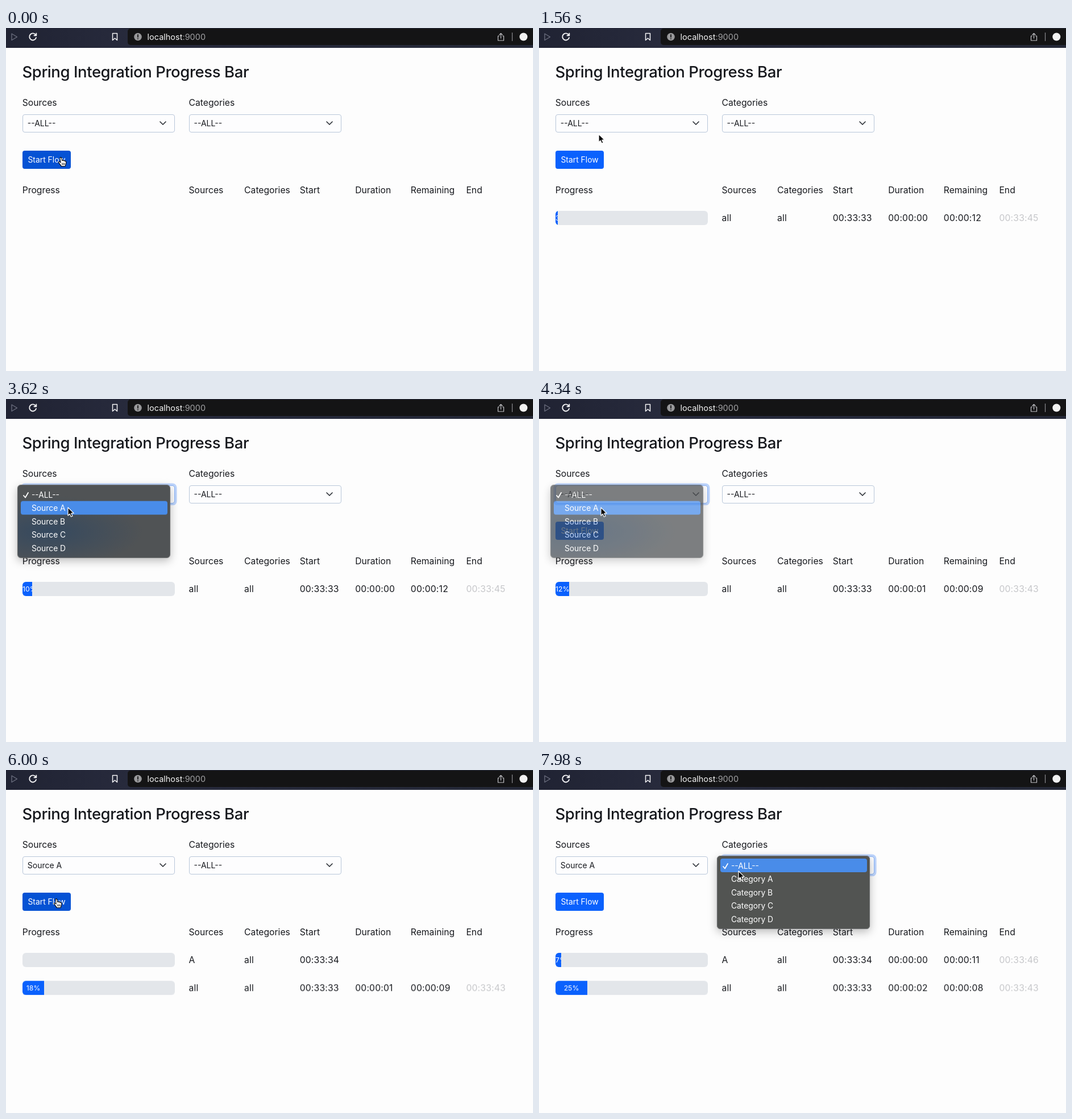
Animation, 927 px wide and 604 px high, one loop 8000 ms. Source, as an HTML page:

```html
<!DOCTYPE html>
<html lang="en">
<head>
<meta charset="utf-8">
<title>Progress bar demo</title>
<style>
@property --p { syntax: "<integer>"; inherits: true; initial-value: 0; }

html, body { margin: 0; width: 100%; height: 100%; overflow: hidden; }
body { background: #fdfdfd; color: #16181d; font: 15.7px/20px Inter, sans-serif; }
#stage { position: relative; width: 927px; height: 604px; overflow: hidden; }
#stage * { box-sizing: border-box; }
#stage div, #stage span, #stage svg, h1 { position: absolute; white-space: nowrap; }
svg { overflow: visible; fill: none; stroke-linecap: round; stroke-linejoin: round; }

/* every animation shares one 8 s loop */
.anim { animation: 8s linear infinite; }
.step { animation: 8s step-end infinite; }

.chrome { inset: 0 0 auto; height: 35px; background: linear-gradient(90deg, #202333, #272a3c 23%, #252938); }
.url { left: 214px; top: 1px; width: 720px; height: 29px; border-radius: 5px; background: #141415; }
.address { left: 248.5px; top: 5.5px; color: #f4f4f4; font-size: 14.5px; }
.address b { font-weight: 400; color: #a2a2a4; }

h1 { left: 28.5px; top: 67px; margin: 0; font-size: 27.5px; font-weight: 500; letter-spacing: -.42px; }
.col { left: calc(28.8px + var(--c) * 97.58px); }
.label { top: 121.5px; }
.head { top: 275.5px; }

.select { top: 151.5px; width: 268px; height: 32px; border: 1px solid #b9c7d9; border-radius: 4px; background: #fdfdfe; font-size: 14px; }
.select span { left: 8px; top: 5px; }
.select svg { left: 241px; top: 12px; stroke: #292d33; stroke-width: 1.6; }
.ring { inset: -1px; border: 1px solid #8bb5f8; border-radius: 4px; box-shadow: 0 0 0 3.5px #bcd4fd; }

.button { left: 29px; top: 216px; width: 85px; height: 32px; border-radius: 4px; background: #0a61fd; color: #fff; font-size: 13.9px; line-height: 32px; text-align: center; animation-name: hover; }

.row { left: 0; top: 322px; width: 927px; height: 25px; line-height: 25px; letter-spacing: .18px; }
.track { left: 29px; top: 0; width: 268px; height: 24.5px; border-radius: 6px; background: #e3e6ea; overflow: hidden; }
#stage .fill { left: 0; top: 0; height: 100%; background: #0a61fd; color: #fff; overflow: hidden; counter-reset: pct var(--p); font-size: 12.3px; letter-spacing: 0; text-align: center; }
.fill::after { content: counter(pct) "%"; }
.end { color: #c6c7ca; }

.menu { top: 150.5px; width: 269px; height: 129px; border-radius: 6px; border: 1px solid #6b6d6e; background: #525452; box-shadow: 0 0 1px #0008, 0 5px 16px #0004; color: #fff; font-size: 13.8px; }
.menu span { left: 24px; top: calc(7px + var(--i) * 23.65px); }
.menu .mark { left: 5px; top: 4.5px; width: 258px; height: 24px; border-radius: 4px; background: #498ce9; }
.menu svg { left: 9px; top: 11px; stroke: #fff; stroke-width: 1.8; }
.sources { left: 20px; background: radial-gradient(ellipse at 20% 64%, #35495f, #505355 55%); }
.categories { left: 313px; }

#cursor { left: 0; top: 0; animation-name: move; }
#cursor svg { left: 0; top: 0; }
#cursor .hand { left: -1px; top: -1px; }

.row-all { animation-name: appear-all, shift; }
.row-a { animation-name: appear-a; }
.all-1 { animation-name: all-1; }
.all-2 { animation-name: all-2; }
.all-3 { animation-name: all-3; }
.a-1 { animation-name: a-1; }
.fill-all { animation-name: count-all, grow-all; }
.fill-a { animation-name: count-a, grow-a; }
.before { animation-name: before; }
.after { animation-name: after; }
.sources { animation-name: open-sources; }
.categories { animation-name: open-categories; }
.sources .mark { animation-name: highlight; }
.ring-s { animation-name: ring-s; }
.ring-c { animation-name: ring-c; }
.hand { animation-name: hand; }
.arrow { animation-name: arrow; }

@keyframes appear-all { 0% { opacity: 0 } 6.5%, to { opacity: 1 } }
@keyframes shift { 0% { transform: none } 71.25%, to { transform: translateY(49.3px) } }
@keyframes appear-a { 0% { opacity: 0 } 71.25%, to { opacity: 1 } }
@keyframes all-1 { 0% { opacity: 0 } 16.25% { opacity: 1 } 48.75%, to { opacity: 0 } }
@keyframes all-2 { 0% { opacity: 0 } 48.75% { opacity: 1 } 81.25%, to { opacity: 0 } }
@keyframes all-3 { 0% { opacity: 0 } 81.25%, to { opacity: 1 } }
@keyframes a-1 { 0% { opacity: 0 } 80.5%, to { opacity: 1 } }
@keyframes count-all { 0%, 10.4% { --p: 0 } to { --p: 25 } }
@keyframes count-a { 0%, 72.5% { --p: 0 } to { --p: 7 } }
@keyframes grow-all {
  0%, 9% { width: 0 }
  19.5% { width: 4px }
  45.25% { width: 17.3px }
  59.5% { width: 27.8px }
  75% { width: 38px }
  91.25% { width: 50.5px }
  to { width: 56.3px }
}
@keyframes grow-a { 0%, 76.25% { width: 0 } 91.25% { width: 6px } to { width: 10.2px } }
@keyframes before { 0% { opacity: 1 } 62.8%, to { opacity: 0 } }
@keyframes after { 0% { opacity: 0 } 62.8%, to { opacity: 1 } }
@keyframes open-sources { 0%, 26.24% { opacity: 0 } 26.25%, 53.5% { opacity: 1 } 56.5%, to { opacity: 0 } }
@keyframes open-categories { 0% { opacity: 0 } 95.75%, to { opacity: 1 } }
@keyframes highlight { 0% { transform: none } 39.3%, to { transform: translateY(23.65px) } }
@keyframes ring-s { 0%, 25% { opacity: 0 } 29%, 69.5% { opacity: 1 } 74.5%, to { opacity: 0 } }
@keyframes ring-c { 0%, 95% { opacity: 0 } 99%, to { opacity: 1 } }
@keyframes hover {
  0%, 12.5% { background: #0552d4 }
  17%, 60.5% { background: #0a61fd }
  64%, 79.5% { background: #0552d4 }
  83.5%, to { background: #0a61fd }
}
@keyframes hand { 0% { opacity: 1 } 12.9% { opacity: 0 } 61.5% { opacity: 1 } 79.5%, to { opacity: 0 } }
@keyframes arrow { 0% { opacity: 0 } 12.9% { opacity: 1 } 61.5% { opacity: 0 } 79.5%, to { opacity: 1 } }
@keyframes move {
  0%, 9% { transform: translate(98px, 229px); animation-timing-function: ease-in-out }
  19.5% { transform: translate(105px, 187px) }
  24.5%, 36% { transform: translate(107px, 170px); animation-timing-function: ease-in-out }
  42%, 54% { transform: translate(109px, 191px); animation-timing-function: ease-in-out }
  59.5% { transform: translate(93px, 224px) }
  63%, 76% { transform: translate(90px, 228px); animation-timing-function: ease-in-out }
  90%, 91.25% { transform: translate(349px, 159px) }
  95.5% { transform: translate(350px, 166px) }
  99.75%, to { transform: translate(351px, 178px) }
}
</style>
</head>
<body>
<div id="stage">
  <div class="chrome">
    <div class="url"></div>
    <svg width="927" height="34" stroke="#f2f2f4" stroke-width="1.5">
      <path d="M10 10V21.5L19.5 15.7Z" stroke="#6d7080" stroke-width="1.3"/>
      <path d="M52.3 12.2A6 6 0 1 0 53 17M53.3 9.5V13.2H49.5" stroke-width="1.9"/>
      <path d="M187.5 9.5H195.5V21.5L191.5 18L187.5 21.5Z"/>
      <circle cx="232" cy="15.5" r="6.8" fill="#98989a" stroke="none"/>
      <path d="M232 11.8V16M232 19V19.1" stroke="#141415" stroke-width="1.8"/>
      <path d="M867.5 14H865.5V22H875.5V14H873.5M870.5 18V9.5M867.8 12L870.5 9.3L873.2 12" stroke="#c4c4c8" stroke-width="1.2"/>
      <path d="M890.5 8.5V22.5" stroke="#8b8b90" stroke-width="1.2"/>
      <circle cx="910.3" cy="15.5" r="7" fill="#f2f2f2" stroke="none"/>
    </svg>
    <span class="address">localhost<b>:9000</b></span>
  </div>

  <h1>Spring Integration Progress Bar</h1>

  <span class="col label" style="--c:0">Sources</span>
  <span class="col label" style="--c:3">Categories</span>
  <div class="col select" style="--c:0">
    <div class="ring ring-s anim"></div>
    <span class="before step">--ALL--</span>
    <span class="after step">Source A</span>
    <svg width="10" height="6"><path d="M0 0L5 5L10 0"/></svg>
  </div>
  <div class="col select" style="--c:3">
    <div class="ring ring-c anim"></div>
    <span>--ALL--</span>
    <svg width="10" height="6"><path d="M0 0L5 5L10 0"/></svg>
  </div>

  <div class="button anim">Start Flow</div>

  <span class="col head" style="--c:0">Progress</span>
  <span class="col head" style="--c:3">Sources</span>
  <span class="col head" style="--c:4">Categories</span>
  <span class="col head" style="--c:5">Start</span>
  <span class="col head" style="--c:6">Duration</span>
  <span class="col head" style="--c:7">Remaining</span>
  <span class="col head" style="--c:8">End</span>

  <div class="row row-a step">
    <div class="track"><div class="fill fill-a anim"></div></div>
    <span class="col" style="--c:3">A</span>
    <span class="col" style="--c:4">all</span>
    <span class="col" style="--c:5">00:33:34</span>
    <div class="a-1 step">
      <span class="col" style="--c:6">00:00:00</span>
      <span class="col" style="--c:7">00:00:11</span>
      <span class="col end" style="--c:8">00:33:46</span>
    </div>
  </div>

  <div class="row row-all step">
    <div class="track"><div class="fill fill-all anim"></div></div>
    <span class="col" style="--c:3">all</span>
    <span class="col" style="--c:4">all</span>
    <span class="col" style="--c:5">00:33:33</span>
    <div class="all-1 step">
      <span class="col" style="--c:6">00:00:00</span>
      <span class="col" style="--c:7">00:00:12</span>
      <span class="col end" style="--c:8">00:33:45</span>
    </div>
    <div class="all-2 step">
      <span class="col" style="--c:6">00:00:01</span>
      <span class="col" style="--c:7">00:00:09</span>
      <span class="col end" style="--c:8">00:33:43</span>
    </div>
    <div class="all-3 step">
      <span class="col" style="--c:6">00:00:02</span>
      <span class="col" style="--c:7">00:00:08</span>
      <span class="col end" style="--c:8">00:33:43</span>
    </div>
  </div>

  <div class="menu sources anim">
    <div class="mark step"></div>
    <svg width="10" height="12"><path d="M1 7L4 10.5L9 2"/></svg>
    <span style="--i:0">--ALL--</span>
    <span style="--i:1">Source A</span>
    <span style="--i:2">Source B</span>
    <span style="--i:3">Source C</span>
    <span style="--i:4">Source D</span>
  </div>
  <div class="menu categories step">
    <div class="mark"></div>
    <svg width="10" height="12"><path d="M1 7L4 10.5L9 2"/></svg>
    <span style="--i:0">--ALL--</span>
    <span style="--i:1">Category A</span>
    <span style="--i:2">Category B</span>
    <span style="--i:3">Category C</span>
    <span style="--i:4">Category D</span>
  </div>

  <div id="cursor" class="anim">
    <svg class="arrow step" width="12" height="18">
      <path d="M0 0V14.2L3.2 11.2L5.4 16.3L8 15.2L5.8 10.2H10.2Z" fill="#000" stroke="#fff" stroke-width="1.2"/>
    </svg>
    <svg class="hand step" width="14" height="18">
      <path d="M-2 1.5C-2 -.6 .6 -.6 .9 1.3L1.7 5.6C2.2 4.2 4 4.4 4.2 6C5 4.9 6.6 5.3 6.7 6.7C7.8 6 9 6.8 8.8 8.4C8.7 11.5 7.7 12.6 7.2 15.5H.2C-.6 12.9 -3.4 11 -4.4 8.8C-4.9 7.4 -3.2 6.7 -2.2 7.8L-.8 9Z" fill="#fff" stroke="#000" stroke-width="1.1"/>
      <path d="M1.8 10V13M3.9 10V13M6 10V13" stroke="#000" stroke-width=".9"/>
    </svg>
  </div>
</div>
</body>
</html>
```
